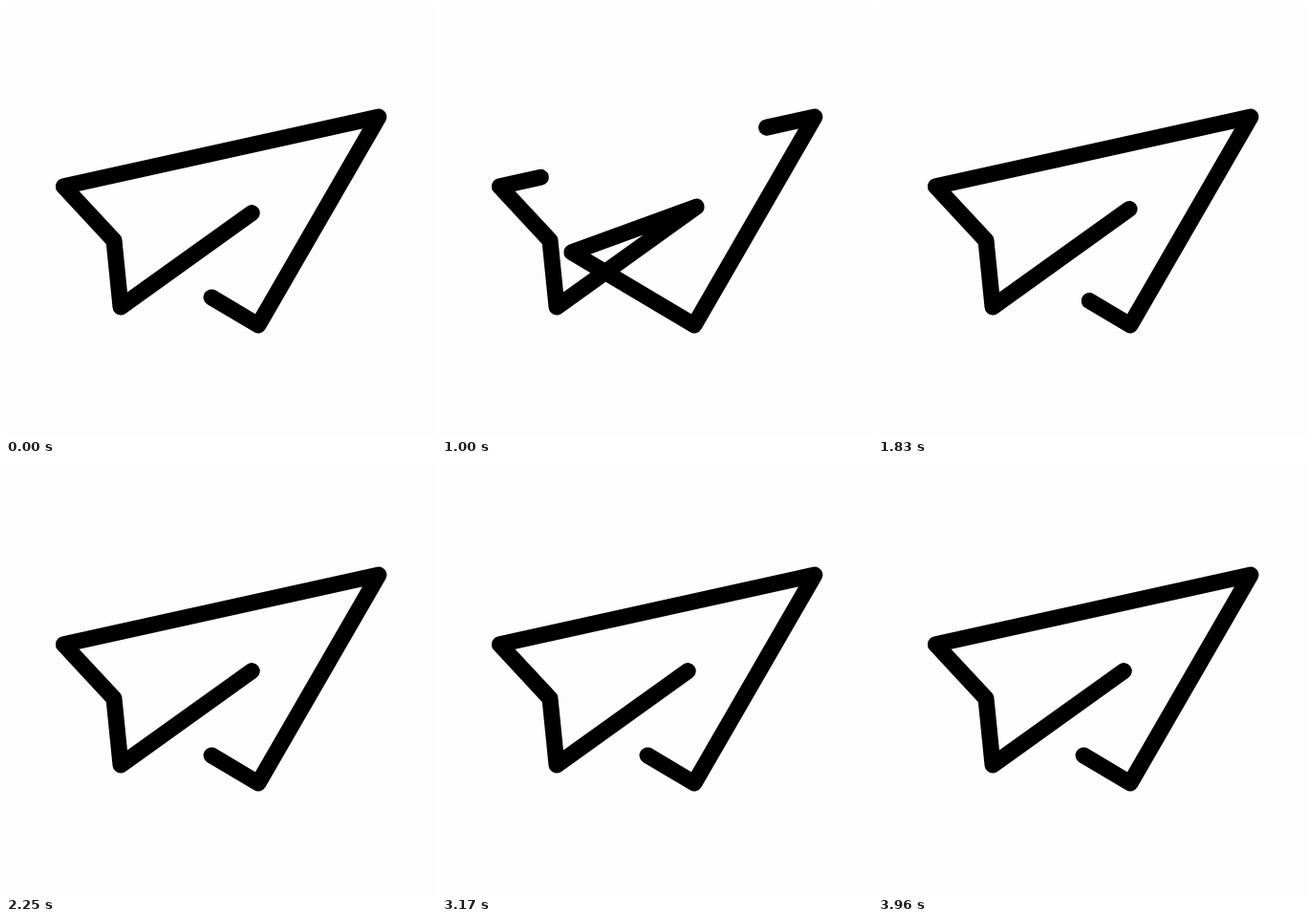
Write an HTML page with a canvas that moves like this. It is 450 px wide and 450 px high and loops after 4 s.

```html
<!DOCTYPE html>
<html lang="en">
<head>
<meta charset="utf-8">
<title>Paper plane</title>
<style>
  html, body { margin: 0; width: 100%; height: 100%; overflow: hidden; background: #fdfdfe; }
  canvas { display: block; width: 450px; height: 450px; }
</style>
</head>
<body>
<canvas id="stage" width="450" height="450"></canvas>
<script>
const ctx = document.getElementById('stage').getContext('2d');
const LOOP = 4000, TRAVEL = 2000, FPS = 24;
const GAP = 242;

// Closed outline, starting at the nose
const points = [
  [390, 116], [60.3, 188.8], [113, 245.4], [120, 315],
  [266.2, 210.2], [135.8, 257.8], [264, 334]
];
const lengths = points.map(([x, y], i) => {
  const [nx, ny] = points[(i + 1) % points.length];
  return Math.hypot(nx - x, ny - y);
});
const sum = list => list.reduce((a, b) => a + b, 0);
const total = sum(lengths);
const rest = sum(lengths.slice(0, 5)) + 92.2;

const plane = new Path2D();
points.forEach(([x, y]) => plane.lineTo(x, y));
plane.closePath();

// Cubic bezier easing (k, 0, 1 - k, 1)
function ease(x, k = 0.66) {
  if (x <= 0) return 0;
  if (x >= 1) return 1;
  let lo = 0, hi = 1;
  for (let i = 0; i < 30; i++) {
    const t = (lo + hi) / 2, s = 1 - t;
    const bx = 3 * k * t * s * s + 3 * (1 - k) * t * t * s + t * t * t;
    if (bx < x) lo = t; else hi = t;
  }
  return lo * lo * (3 - 2 * lo);
}

// Hold each picture on a 24 fps grid, rounded to 10 ms
function snap(ms) {
  const tick = Math.floor(ms / 10) * 10;
  return Math.floor((tick + 4.9) * FPS / 1000) * 1000 / FPS;
}

function draw(ms) {
  const start = rest - total * ease(snap(ms) / TRAVEL);
  ctx.fillStyle = '#fdfdfe';
  ctx.fillRect(0, 0, 450, 450);
  ctx.strokeStyle = '#000';
  ctx.lineWidth = 17;
  ctx.lineCap = ctx.lineJoin = 'round';
  ctx.setLineDash([total - GAP, GAP]);
  ctx.lineDashOffset = -start;
  ctx.stroke(plane);
}

const begin = performance.now();
function frame() {
  draw((performance.now() - begin) % LOOP);
  requestAnimationFrame(frame);
}
frame();
</script>
</body>
</html>
```
